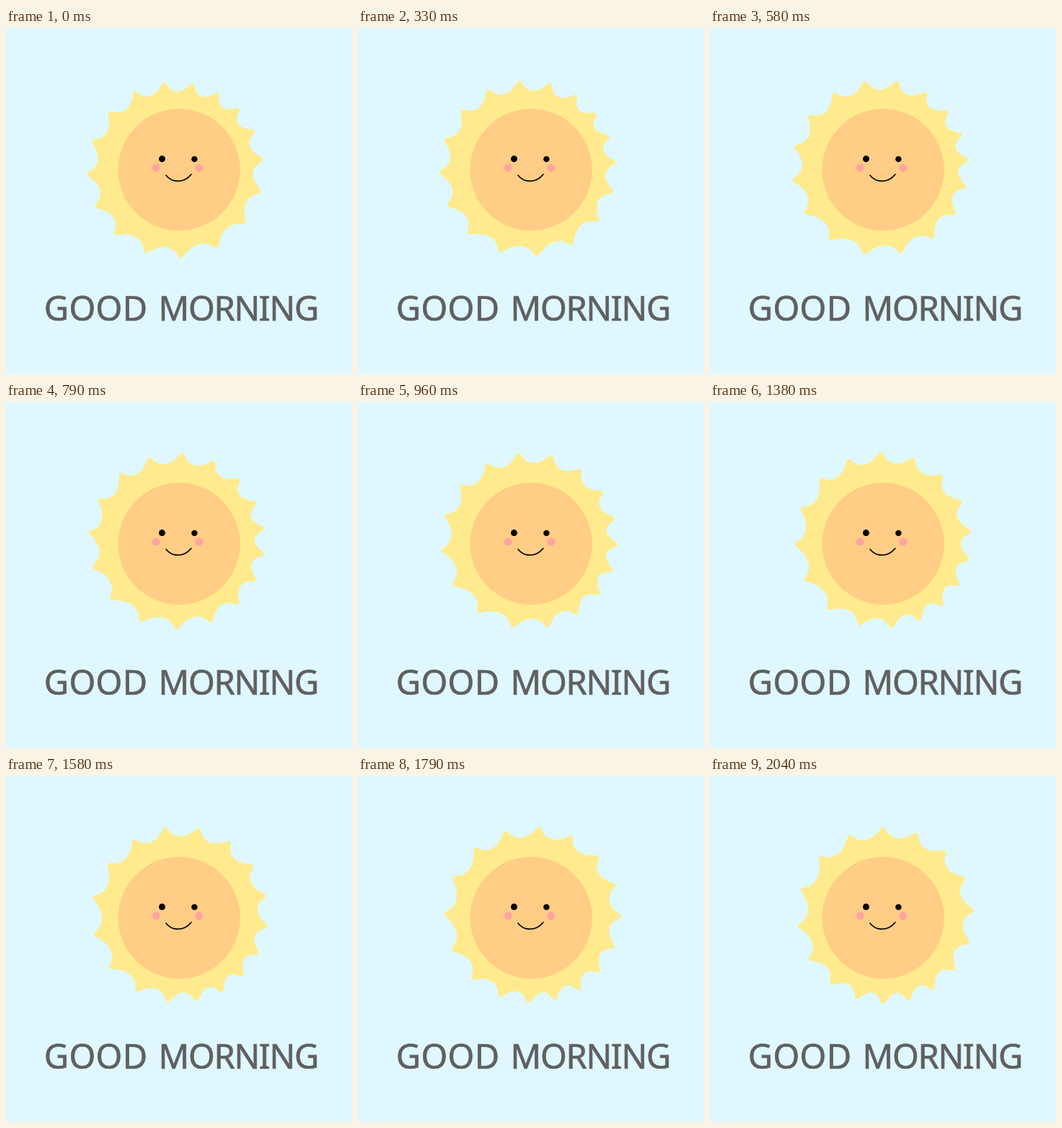
Write an HTML page that moves like this. It is 480 by 480 pixels and loops after 2.08 s.

```html
<!DOCTYPE html>
<html lang="en">
<head>
<meta charset="utf-8">
<title>Good morning</title>
<style>
  html, body { margin: 0; width: 100%; height: 100%; overflow: hidden; background: #dff8ff; }
  svg { display: block; width: 100%; height: 100%; }
  text { font: 500 47.2px "Noto Sans", "DejaVu Sans", sans-serif; fill: #606060; stroke: #606060; stroke-width: .7; }
</style>
</head>
<body>
<svg viewBox="0 0 480 480">
  <path id="rays" fill="#ffeb8e" stroke="#ffeb8e" stroke-width="7" stroke-linejoin="round"/>
  <circle cx="240.2" cy="196.7" r="84.6" fill="#ffcd86"/>
  <g fill="#ffa3a0">
    <circle cx="208.3" cy="194" r="5.4"/>
    <circle cx="267.7" cy="194" r="5.4"/>
  </g>
  <circle cx="216.5" cy="181.6" r="4.5"/>
  <circle cx="261.4" cy="181.9" r="4.2"/>
  <path d="M222 204.3C230 215 247 215.6 257 203" fill="none" stroke="#000" stroke-width="1.6" stroke-linecap="round"/>
  <text x="52.8" y="406" letter-spacing=".3">GOOD</text>
  <text x="211.6" y="406" letter-spacing="-1.4">MORNING</text>
</svg>
<script>
const LOOP = 2080, DEGREES_PER_STEP = 2.765;
const RAYS = 17, TIP = 118.7, VALLEY = 101, OFF_CENTRE = -5;
const rays = document.getElementById('rays');
const rad = degrees => degrees * Math.PI / 180;

// Clockwise angle of a ray from the top: even spacing, made uneven by two waves
function rayAngle(i) {
  const turn = i * 360 / RAYS;
  return turn - 13.3 - 8 * Math.cos(rad(turn - 123)) + 1.95 * Math.cos(rad(2 * turn - 36));
}

function polar(angle, radius) {
  const a = rad(angle);
  return (OFF_CENTRE + radius * Math.sin(a)).toFixed(2) + ' ' + (-radius * Math.cos(a)).toFixed(2);
}

// Valleys sit close behind each tip, so the rays lean clockwise
function outline() {
  let d = 'M' + polar(rayAngle(0), TIP);
  for (let i = 0; i < RAYS; i++) {
    const from = rayAngle(i), to = rayAngle(i + 1), gap = to - from;
    d += 'C' + [polar(from + gap * .2, VALLEY), polar(from + gap * .64, VALLEY), polar(to, TIP)];
  }
  return d + 'Z';
}

rays.setAttribute('d', outline());

const start = performance.now();
function draw() {
  const time = (performance.now() - start) % LOOP;
  // 24 steps a second, each beginning on the nearest 10 ms
  const step = Math.ceil((Math.floor(time / 10) * 24 + 12) / 100) - 1;
  rays.setAttribute('transform', `translate(239.8 197) rotate(${step * DEGREES_PER_STEP})`);
  requestAnimationFrame(draw);
}
draw();
</script>
</body>
</html>
```
